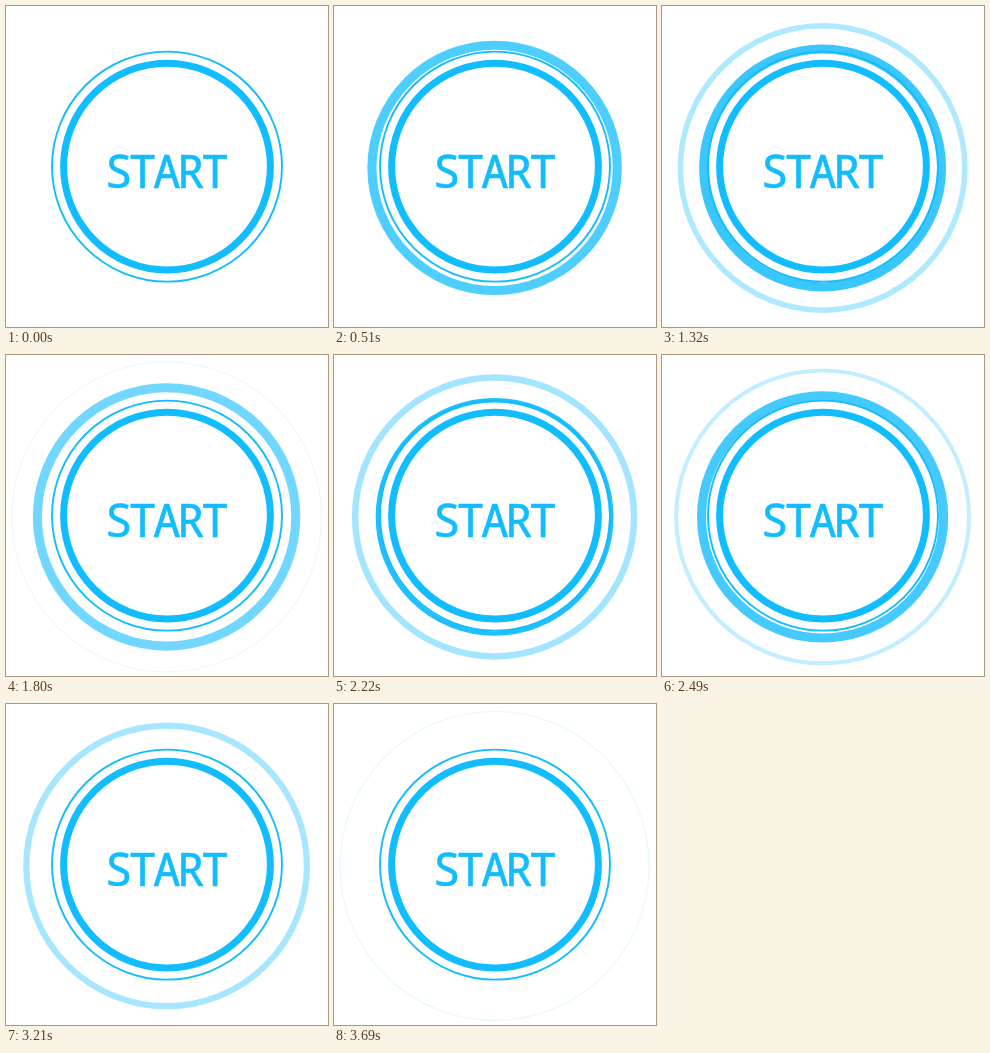
Animation of 322 by 321 pixels, one loop 4320 ms. Source, as an HTML page:

```html
<!DOCTYPE html>
<html lang="en">
<head>
<meta charset="utf-8">
<title>Start button</title>
<style>
  html, body { margin: 0; width: 100%; height: 100%; overflow: hidden; background: #fff; }
  svg { display: block; width: 322px; height: 321px; }
  circle { fill: none; stroke: #11bcff; }
  text {
    font: 500 46px "Noto Sans Mono", monospace;
    letter-spacing: -3.5px;
    text-anchor: middle;
    fill: #11bcff;
    stroke: #11bcff;
    stroke-width: 0.6px;
  }
</style>
</head>
<body>
<svg viewBox="0 0 322 321">
  <g id="ripples"></g>
  <circle cx="161" cy="160.6" r="115" stroke-width="1.9"/>
  <circle cx="161" cy="160.6" r="103.4" stroke-width="7"/>
  <text x="159" y="182">START</text>
</svg>
<script>
  const LOOP = 4320, LAST_MOVE = 3690, STEP = 30;
  const ripples = [
    { start: 0, life: 1820 },
    { start: 970, life: 1870 },
    { start: 2100, life: 1620 },
  ];

  const group = document.getElementById('ripples');
  for (const ripple of ripples) {
    ripple.ring = document.createElementNS('http://www.w3.org/2000/svg', 'circle');
    ripple.ring.setAttribute('cx', 160.6);
    ripple.ring.setAttribute('cy', 161.9);
    group.append(ripple.ring);
  }

  // The outer edge grows steadily; the band swells, then thins while fading.
  function drawRipple({ start, life, ring }, time) {
    const u = (time - start) / life;
    const visible = u > 0 && u < 1;
    ring.style.display = visible ? '' : 'none';
    if (!visible) return;
    const outer = 116 + 40 * u;
    const width = Math.min(1.5 + 40 * u, 9.1, 1 + 16.5 * (1 - u));
    ring.setAttribute('r', outer - width / 2);
    ring.setAttribute('stroke-width', width);
    ring.setAttribute('stroke-opacity', 1 - 0.92 * u);
  }

  function frame() {
    const now = performance.now() % LOOP;
    const time = Math.min(Math.floor(now / STEP) * STEP, LAST_MOVE);
    for (const ripple of ripples) drawRipple(ripple, time);
    requestAnimationFrame(frame);
  }
  frame();
</script>
</body>
</html>
```
